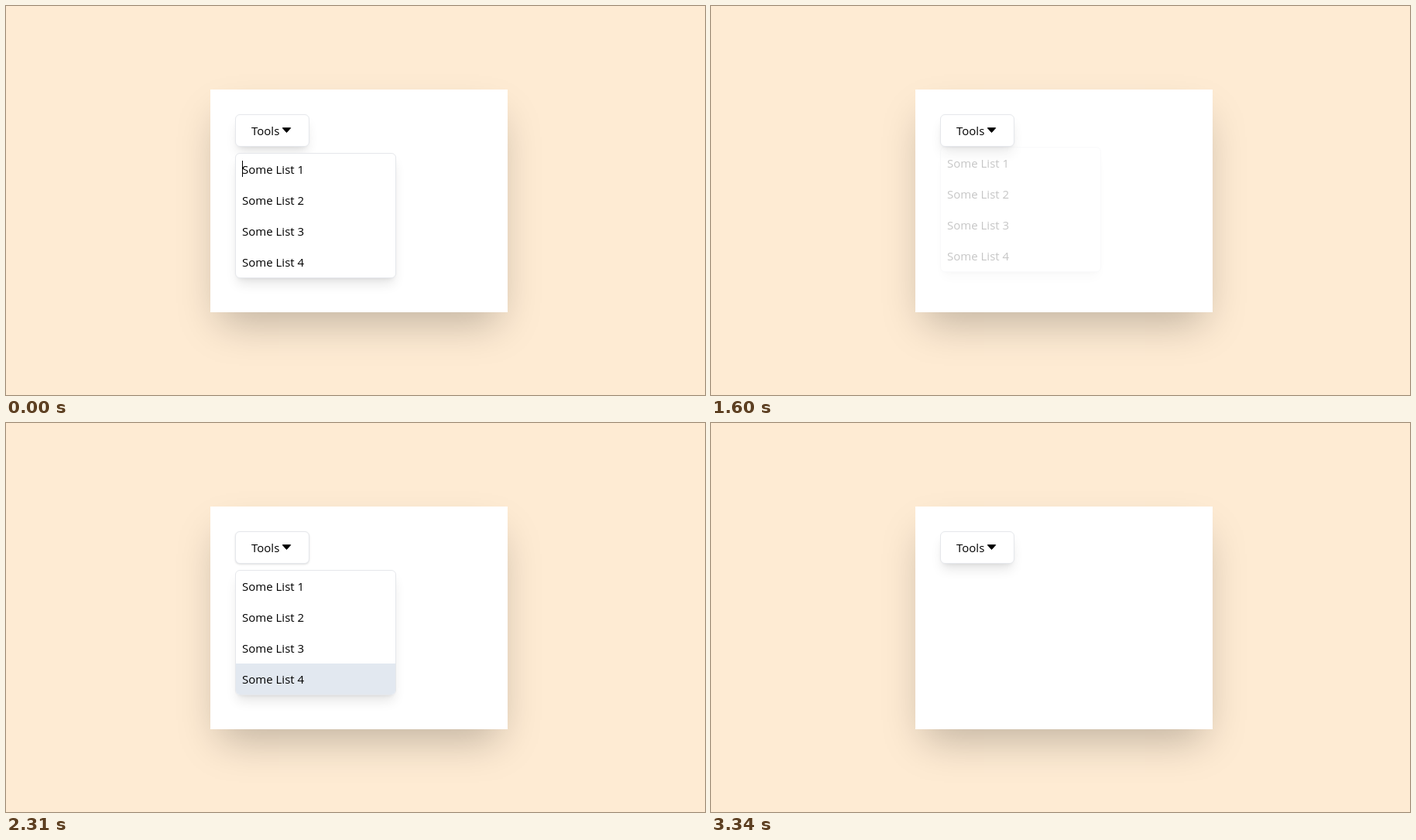
An HTML page that plays this animation: 903x503 px, repeating every 3500 ms.

```html
<!DOCTYPE html>
<html lang="en">
<head>
<meta charset="utf-8">
<title>Dropdown</title>
<style>
  * { box-sizing: border-box; }
  html, body { margin: 0; width: 100%; height: 100%; overflow: hidden; }
  body {
    position: relative;
    background: #feebd3;
    color: #000;
    font: 15px/40px "Open Sans", "Noto Sans", sans-serif;
  }
  .card, .button, .menu, .caret, .arrow { position: absolute; }
  .card {
    left: 264px; top: 108px; width: 384px; height: 288px;
    background: #fff;
    box-shadow: 0 25px 50px -12px rgba(0, 0, 0, .25);
  }
  .button, .menu {
    left: 32px;
    background: #fff;
    border: 1px solid #e5e7eb;
    border-radius: 6px;
  }
  .button {
    top: 32px; width: 96px; height: 42px;
    padding-left: 20px;
    box-shadow: 0 1px 3px rgba(0, 0, 0, .1), 0 1px 2px -1px rgba(0, 0, 0, .1);
  }
  .menu { top: 82px; width: 208px; height: 162px; }
  .menu, .button.hover {
    box-shadow: 0 10px 15px -3px rgba(0, 0, 0, .1), 0 4px 6px -4px rgba(0, 0, 0, .1);
  }
  .row { height: 40px; padding-left: 8px; white-space: pre; }
  .row.hover { background: #e2e8f0; }
  .row.hover:first-child { border-radius: 2px 2px 0 0; }
  .row.hover:nth-child(4) { border-radius: 0 0 5px 5px; }
  .arrow { left: 59px; top: 15px; }
  .caret { left: 8px; top: 9px; width: 1px; height: 21px; background: #000; }
</style>
</head>
<body>
<div class="card">
  <div class="button">Tools<svg class="arrow" width="14" height="10"><path d="M1.3 1.7H11.7L6.5 7.5Z" stroke="#000" stroke-linejoin="round"/></svg></div>
  <div class="menu">
    <div class="row">Some List 1</div>
    <div class="row">Some List 2</div>
    <div class="row">Some List 3</div>
    <div class="row">Some List 4</div>
    <div class="caret"></div>
  </div>
</div>
<script>
  const LOOP = 3500, FADE = 300, LIFT = 10;
  const $ = selector => document.querySelector(selector);
  const button = $('.button'), menu = $('.menu'), caret = $('.caret');
  const rows = [...document.querySelectorAll('.row')];

  // Each fade is displayed in a number of discrete steps.
  const fades = [
    { first: 870, last: 1110, steps: 7, opening: false },
    { first: 1600, last: 1850, steps: 7, opening: true },
    { first: 3050, last: 3340, steps: 8, opening: false }
  ];

  // [time, hovered row], where 0 means none
  const hovers = [
    [0, 0], [1950, 1], [2060, 2], [2140, 3], [2310, 4],
    [2560, 3], [2640, 2], [2720, 1], [2770, 0]
  ];

  // cubic-bezier(.25, .1, .25, 1)
  function ease(x) {
    if (x <= 0) return 0;
    if (x >= 1) return 1;
    const bezier = (a, b, s) => 3 * a * s * (1 - s) ** 2 + 3 * b * s * s * (1 - s) + s ** 3;
    let low = 0, high = 1;
    for (let i = 0; i < 24; i++) {
      const mid = (low + high) / 2;
      if (bezier(.25, .25, mid) < x) low = mid; else high = mid;
    }
    return bezier(.1, 1, low);
  }

  function visibility(t) {
    const fade = fades.filter(f => t >= f.first).pop();
    if (!fade) return 1;
    const { first, last, steps, opening } = fade;
    const gap = (last - first) / (steps - 1);
    const step = Math.min(steps - 1, Math.floor((t - first) / gap + 1e-6));
    const progress = ease((first + step * gap - last + FADE) / FADE);
    return opening ? progress : 1 - progress;
  }

  function render(t) {
    const shown = visibility(t);
    const hovered = hovers.filter(([time]) => t >= time).pop()[1];
    menu.style.opacity = shown;
    menu.style.transform = `translateY(${-LIFT * (1 - shown)}px)`;
    caret.style.visibility = t < 540 ? 'visible' : 'hidden';
    button.classList.toggle('hover', t < 1950 || t >= 2800);
    rows.forEach((row, i) => row.classList.toggle('hover', i + 1 === hovered));
  }

  const start = performance.now();
  function tick() {
    render((performance.now() - start) % LOOP);
    requestAnimationFrame(tick);
  }
  tick();
</script>
</body>
</html>
```
